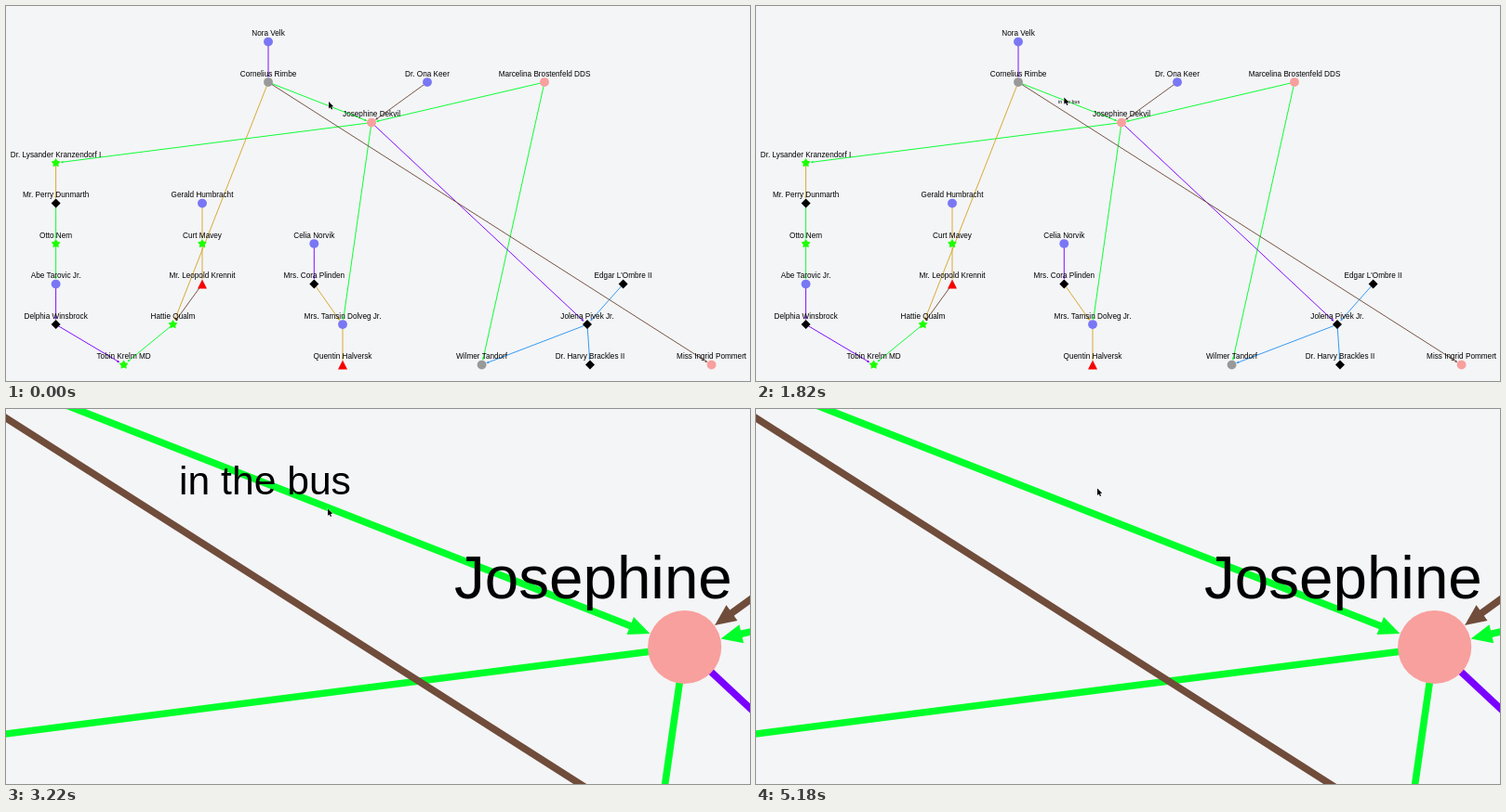
These frames come from a looping animation (800x404 px, 5250 ms). An HTML page with a canvas:

```html
<!DOCTYPE html>
<html lang="en">
<head>
<meta charset="utf-8">
<title>Relation graph</title>
<style>
html, body { margin: 0; width: 100%; height: 100%; overflow: hidden; background: #f4f5f7; }
canvas { display: block; }
</style>
</head>
<body>
<canvas id="stage" width="800" height="404"></canvas>
<script>
const LOOP = 5250, STEP = 70;
const ctx = document.getElementById('stage').getContext('2d');
const menuCanvas = document.createElement('canvas');
menuCanvas.width = menuCanvas.height = 160;
const mctx = menuCanvas.getContext('2d');

const SANS = '"Liberation Sans", Arial, sans-serif';
const FILL = { circle: '#7a77f5', gray: '#999999', pink: '#f8a09d', star: '#1cff00', diamond: '#000', triangle: '#f50000' };
const LINE = 0.95, ARROW = { length: 2.85, half: 1.28 };

// name, x, row, kind; edges refer to nodes by letter, in this order
const nodes = [
  ['Nora Velk', 282, 0, 'circle'],
  ['Cornelius Rimbe', 282, 1, 'gray'],
  ['Dr. Ona Keer', 453, 1, 'circle'],
  ['Marcelina Brostenfeld DDS', 579, 1, 'pink'],
  ['Josephine Dekvil', 393, 2, 'pink'],
  ['Dr. Lysander Kranzendorf I', 53.6, 3, 'star'],
  ['Mr. Perry Dunmarth', 53.6, 4, 'diamond'],
  ['Gerald Humbracht', 211, 4, 'circle'],
  ['Otto Nem', 53.6, 5, 'star'],
  ['Curt Mavey', 211, 5, 'star'],
  ['Celia Norvik', 331.3, 5, 'circle'],
  ['Abe Tarovic Jr.', 53.6, 6, 'circle'],
  ['Mr. Leopold Krennit', 211, 6, 'triangle'],
  ['Mrs. Cora Plinden', 331.3, 6, 'diamond'],
  ["Edgar L'Ombre II", 663.6, 6, 'diamond'],
  ['Delphia Winsbrock', 53.6, 7, 'diamond'],
  ['Hattie Qualm', 179.5, 7, 'star'],
  ['Mrs. Tamsin Dolveg Jr.', 362, 7, 'circle'],
  ['Jolena Pivek Jr.', 625, 7, 'diamond'],
  ['Tobin Krelm MD', 126.6, 8, 'star'],
  ['Quentin Halversk', 362, 8, 'triangle'],
  ['Wilmer Tandorf', 511.6, 8, 'gray'],
  ['Dr. Harvy Brackles II', 628, 8, 'diamond'],
  ['Miss Ingrid Pommert', 758.6, 8, 'pink']
].map(([name, x, row, kind]) => ({ name, x, y: 38.6 + 43.5 * row, kind }));

const edges = {
  '#00ff2a': 'be de ef er dv gi il qt',
  '#d6a62c': 'bq fg hj jm nr ru',
  '#7a00ff': 'ab es lp pt kn',
  '#2a95f3': 'os sv sw',
  '#704c3b': 'ce mq bx'
};
const node = letter => nodes[letter.charCodeAt(0) - 97];

// Timeline
const FOCUS = { x: 344.9, y: 106.9 };
const ZOOM = { start: 2310, length: 605, to: 8 };
const LABEL = [1680, 4620];
const menus = [
  { from: 700, to: 1680, x: 347, y: 103 },
  { from: 3640, to: 4620, x: 352, y: 107 }
];
const cursorPath = [
  [0, 347, 103], [980, 347, 103], [1260, 327, 96], [1680, 327, 96],
  [2170, 349, 108], [2310, 349, 108], [2450, 346, 107.5], [3360, 346, 107.5],
  [3500, 352, 106.5], [4060, 352, 106.5], [4340, 352, 131], [4620, 352, 131],
  [5040, 367, 85.5], [LOOP, 367, 85.5]
];

function cursorAt(t) {
  const i = cursorPath.findIndex(k => k[0] > t);
  const [t0, x0, y0] = cursorPath[i - 1], [t1, x1, y1] = cursorPath[i];
  const u = (t - t0) / (t1 - t0), e = u * u * (3 - 2 * u);
  return { x: x0 + (x1 - x0) * e, y: y0 + (y1 - y0) * e };
}

function zoomAt(t) {
  const u = Math.min(1, Math.max(0, (t - ZOOM.start) / ZOOM.length));
  return ZOOM.to ** (1 - (1 - u) ** 3);
}

function polygon(points) {
  ctx.beginPath();
  points.forEach(([x, y]) => ctx.lineTo(x, y));
  ctx.closePath();
}

function segment(x0, y0, x1, y1, width, color, cap = 'butt') {
  ctx.lineWidth = width;
  ctx.strokeStyle = color;
  ctx.lineCap = cap;
  ctx.beginPath();
  ctx.moveTo(x0, y0);
  ctx.lineTo(x1, y1);
  ctx.stroke();
}

function drawEdge(a, b, color) {
  const length = Math.hypot(b.x - a.x, b.y - a.y);
  const ux = (b.x - a.x) / length, uy = (b.y - a.y) / length;
  const tipX = b.x - 5 * ux, tipY = b.y - 5 * uy;
  const backX = tipX - ARROW.length * ux, backY = tipY - ARROW.length * uy;
  const wingX = ARROW.half * uy, wingY = ARROW.half * ux;
  segment(a.x, a.y, backX + ux, backY + uy, LINE, color);
  ctx.fillStyle = color;
  polygon([[tipX, tipY], [backX - wingX, backY + wingY], [backX + wingX, backY - wingY]]);
  ctx.fill();
}

function drawNode({ x, y, kind }) {
  ctx.fillStyle = FILL[kind];
  if (kind === 'diamond') polygon([[x, y - 5], [x + 5, y], [x, y + 5], [x - 5, y]]);
  else if (kind === 'triangle') polygon([[x, y - 5], [x + 5, y + 5], [x - 5, y + 5]]);
  else if (kind === 'star') {
    polygon(Array.from({ length: 10 }, (_, i) => {
      const r = i % 2 ? 3 : 5.2, a = i * Math.PI / 5;
      return [x + r * Math.sin(a), y - r * Math.cos(a)];
    }));
  } else {
    ctx.beginPath();
    ctx.arc(x, y, 4.95, 0, 2 * Math.PI);
  }
  ctx.fill();
}

function drawText(text, x, y, size) {
  ctx.font = `${size}px ${SANS}`;
  ctx.fillStyle = '#000';
  ctx.fillText(text, x, y);
}

function drawGraph(zoom, labelled, pressed) {
  ctx.save();
  ctx.translate(FOCUS.x, FOCUS.y);
  ctx.scale(zoom, zoom);
  ctx.translate(-FOCUS.x, -FOCUS.y);
  ctx.textAlign = 'center';
  for (const color in edges)
    for (const [a, b] of edges[color].split(' ')) drawEdge(node(a), node(b), color);

  const a = node('b'), b = node('e');
  if (pressed) segment(a.x + 4.6, a.y + 1.8, b.x - 5.6, b.y - 2.2, 6.6, 'rgba(0,0,0,.25)', 'round');
  if (labelled) drawText('in the bus', 336.6, 105, 5.33);
  nodes.forEach(drawNode);
  nodes.forEach(n => drawText(n.name, n.x, n.y - 6.6, 8.2));
  ctx.restore();
}

function drawMenu(menu, cursor) {
  const c = mctx, R = 57, HOLE = 16;
  const dx = cursor.x - menu.x, dy = cursor.y - menu.y;
  const angle = Math.atan2(dy, dx), third = 2 * Math.PI / 3;
  c.clearRect(0, 0, 160, 160);
  c.save();
  c.translate(80, 80);
  const wedge = (r, from, to, color) => {
    c.fillStyle = color;
    c.beginPath();
    c.moveTo(0, 0);
    c.arc(0, 0, r, from, to);
    c.fill();
  };
  wedge(R, 0, 2 * Math.PI, 'rgba(0,0,0,.75)');

  const active = Math.hypot(dx, dy) > HOLE;
  if (active) {
    const turn = (angle + 2.5 * Math.PI) % (2 * Math.PI);
    const start = Math.floor(turn / third) * third - Math.PI / 2;
    wedge(R + 11.5, start, start + third, 'rgba(28,108,215,.75)');
  }

  // Cut out the dividers, the centre and the pointer tip
  c.globalCompositeOperation = 'destination-out';
  c.lineWidth = 2;
  for (let i = 0; i < 3; i++) {
    const a = i * third - Math.PI / 2;
    c.beginPath();
    c.moveTo(0, 0);
    c.lineTo(R * Math.cos(a), R * Math.sin(a));
    c.stroke();
  }
  wedge(HOLE, 0, 2 * Math.PI, '#000');
  if (active) {
    c.save();
    c.translate(11 * Math.cos(angle), 11 * Math.sin(angle));
    c.rotate(angle + Math.PI / 4);
    c.fillRect(-9, -9, 18, 18);
    c.restore();
  }

  c.globalCompositeOperation = 'source-over';
  c.fillStyle = '#fff';
  c.font = '9.5px Lato, "Open Sans", sans-serif';
  c.textAlign = 'center';
  c.textBaseline = 'middle';
  [['Show', 'detail', -31.5, -25], ['Edit', 'relation', 30, -25], ['Hide', 'detail', 0, 28]]
    .forEach(([top, bottom, x, y]) => {
      c.fillText(top, x, y);
      c.fillText(bottom, x, y + 13.6);
    });
  c.restore();
  ctx.drawImage(menuCanvas, menu.x - 80, menu.y - 80);
}

function drawCursor({ x, y }) {
  polygon([[0, 0], [0, 7.4], [1.7, 5.9], [2.9, 8.6], [4.1, 8], [3, 5.5], [5.2, 5.3]]
    .map(([px, py]) => [x + px, y + py]));
  ctx.lineWidth = 1;
  ctx.strokeStyle = 'rgba(255,255,255,.8)';
  ctx.stroke();
  ctx.fillStyle = '#000';
  ctx.fill();
}

function frame() {
  const t = Math.floor(performance.now() % LOOP / STEP) * STEP;
  const cursor = cursorAt(t);
  const menu = menus.find(m => t >= m.from && t < m.to);
  ctx.fillStyle = '#f4f5f7';
  ctx.fillRect(0, 0, 800, 404);
  drawGraph(zoomAt(t), t >= LABEL[0] && t < LABEL[1], menu);
  if (menu) drawMenu(menu, cursor);
  drawCursor(cursor);
  requestAnimationFrame(frame);
}
frame();
</script>
</body>
</html>
```
